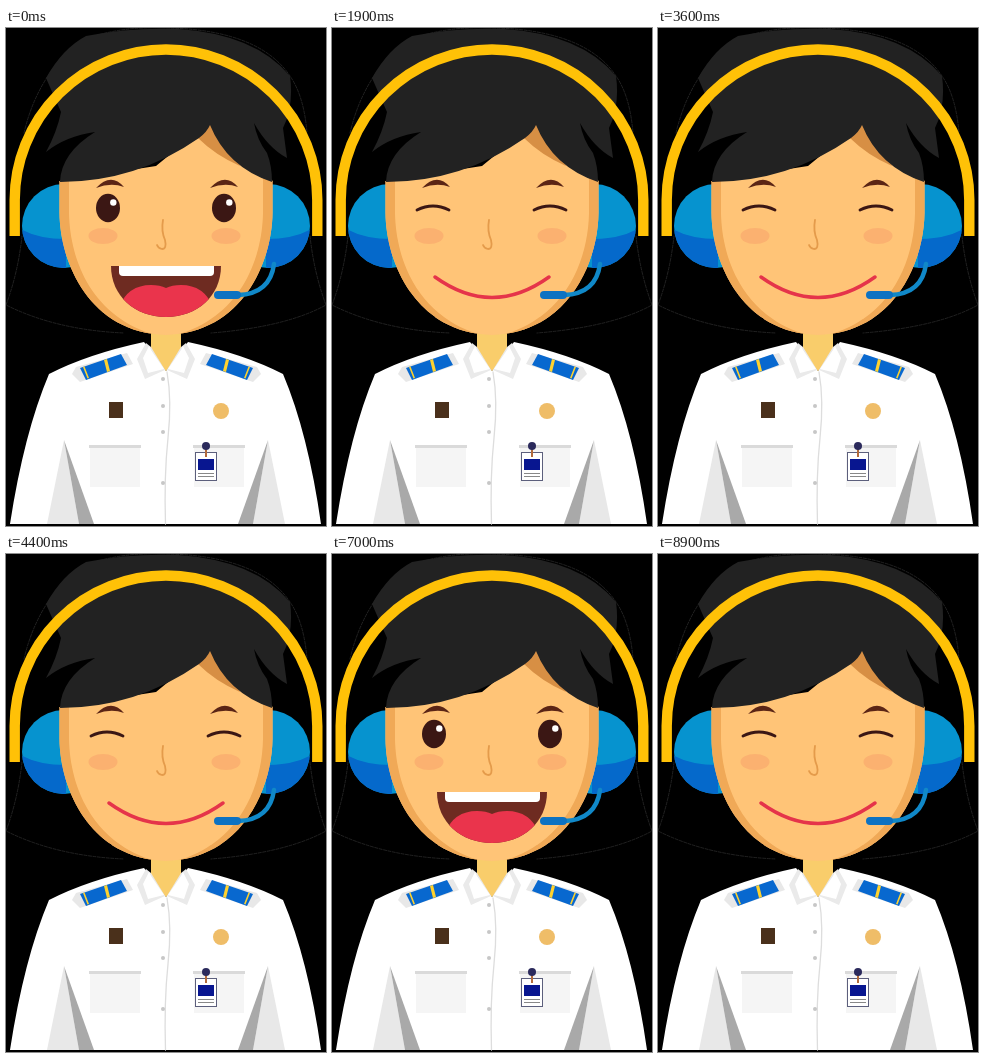
An HTML page for the animation above (9 s loop, 320 by 498 pixels).

```html
<!DOCTYPE html>
<html lang="en">
<head>
<meta charset="utf-8">
<title>Talking operator</title>
<style>
html, body { margin: 0; width: 100%; height: 100%; overflow: hidden; background: #000; }
svg { display: block; width: 100vw; height: 100vh; }
.line { fill: none; stroke-linecap: round; }
</style>
</head>
<body>
<svg viewBox="0 0 320 498" preserveAspectRatio="none">
  <defs>
    <clipPath id="faceClip"><path d="M53.5 153V185C54 235 84 305 160 307C236 305 266 235 266.5 185V153L206 92L150 138Z"/></clipPath>
    <clipPath id="grinClip"><path d="M105 238H215C215 268 191 289 160 289S105 268 105 238Z"/></clipPath>
    <clipPath id="roundClip"><path d="M136 254Q139 236 160 236Q181 236 184 254V268C184 283 174 291 160 291S136 283 136 268Z"/></clipPath>
    <clipPath id="cupClip"><circle cx="58" cy="198" r="42"/></clipPath>
    <g id="cup">
      <circle cx="58" cy="198" r="42" fill="#0693cf"/>
      <path clip-path="url(#cupClip)" d="M10 198Q28 211 60 211V245H10Z" fill="#0569cb"/>
    </g>
    <g id="openEye">
      <ellipse cx="102" cy="180" rx="12" ry="14.2" fill="#3b1714"/>
      <circle cx="107.3" cy="174.5" r="3.2" fill="#fff"/>
    </g>
    <path id="shutEye" class="line" d="M85 182Q101 174 117 182" stroke="#3b1714" stroke-width="2.8"/>
    <path id="brow" d="M90 160Q105 144 118 159Q105 154 90 160Z" fill="#5b2515"/>
    <g id="shoulder">
      <path d="M66 346L70 339L121 325L127 336L74 354Z" fill="#e8e8e8"/>
      <path d="M74 340L115 326L121 337L80 352Z" fill="#0868cf"/>
      <path d="M98 332L101 331L104 343L101 344ZM77 339L78.5 338.5L83 350L81.5 350.5Z" fill="#ffd22e"/>
    </g>
    <g id="sleeveFold">
      <path d="M58 412L41 496H73Z" fill="#e8e8e8"/>
      <path d="M58 412L73 496H88Z" fill="#a9a9a9"/>
    </g>
    <g id="pocket">
      <path d="M84 417H134V459H84Z" fill="#f5f5f5"/>
      <path d="M83 417H135V420H83Z" fill="#dadada"/>
    </g>
  </defs>

  <rect width="320" height="498"/>

  <g class="line" stroke="#2a2a2a" stroke-width=".8" stroke-dasharray="3 1.5">
    <path d="M16 208Q12 245 0 277Q50 302 118 305M304 208Q308 245 320 277Q280 299 205 305"/>
    <path d="M18 105Q31 49 72 14Q112 -3 165 0Q254 3 284 48Q298 68 301 105"/>
  </g>

  <path d="M145 292H175V326L160 343L145 326Z" fill="#f9cd6b"/>

  <g id="jacket">
    <path d="M4 496Q18 405 43 346Q82 326 138 314L160 343L182 314Q238 326 277 346Q302 405 315 496Z" fill="#fff"/>
    <use href="#sleeveFold"/>
    <use href="#sleeveFold" transform="translate(320) scale(-1 1)"/>
    <path d="M145 322L160 343L175 322V302H145Z" fill="#f9cd6b"/>
    <g id="collarSide">
      <path d="M140 315L131 331L139 351L159 342L145 319Z" fill="#eaeaea"/>
      <path d="M143 318L137 330L142 345L158 341L145 322Z" fill="#fff"/>
    </g>
    <use href="#collarSide" transform="translate(320) scale(-1 1)"/>
    <path class="line" d="M161 344Q166 372 162 410T159.5 496" stroke="#ddd" stroke-width="1.3"/>
    <g id="buttons" fill="#c7c7c7"></g>
    <use href="#shoulder"/>
    <use href="#shoulder" transform="translate(321) scale(-1 1)"/>
    <use href="#pocket"/>
    <use href="#pocket" x="104"/>
    <rect x="103" y="374" width="14" height="16" fill="#4a301b"/>
    <circle cx="215" cy="383" r="8" fill="#efbd68"/>
    <rect x="189.5" y="424.5" width="21" height="28" fill="#fff" stroke="#5c5f7c"/>
    <path d="M192 431H208V442H192Z" fill="#081690"/>
    <path d="M192 445.5H208M192 448.5H208" stroke="#888"/>
    <path d="M200 421V429" stroke="#b36b3b" stroke-width="2"/>
    <circle cx="200" cy="418" r="4" fill="#2b2a5c"/>
  </g>

  <use href="#cup"/>
  <use href="#cup" transform="translate(320) scale(-1 1)"/>

  <g clip-path="url(#faceClip)">
    <rect x="50" y="60" width="220" height="255" fill="#ffc477"/>
    <path id="cheekShade" d="M50 145H63V185C64 235 88 290 150 307L50 310Z" fill="#f0a957"/>
    <use href="#cheekShade" transform="translate(320) scale(-1 1)"/>
    <path d="M204 94L192 110Q209 127 234 138L220 110Z" fill="#d78f44"/>
  </g>

  <path fill="#222" d="M40 124Q51 104 55 84L40 50Q57 20 80 8Q125 -1 172 1Q249 6 284 48Q288 78 277 100L281 130Q262 120 248 95Q251 112 261 125Q266 138 266 154Q221 139 204 97Q201 104 193 110Q130 154 54 154Q55 125 89 104Q60 108 40 124Z"/>
  <path class="line" d="M8.7 208V172A151.3 150.5 0 0 1 311.3 172V208" stroke="#ffc107" stroke-width="10.4" style="stroke-linecap:butt"/>

  <g fill="#fbb170">
    <ellipse cx="97" cy="208" rx="14.5" ry="8"/>
    <ellipse cx="220" cy="208" rx="14.5" ry="8"/>
  </g>
  <use href="#brow"/>
  <use href="#brow" x="114"/>
  <path class="line" d="M157 192Q155 203 159 212Q161 221 156 221Q152 220 151 217" stroke="#e49b4b" stroke-width="1.8"/>

  <g id="eyesOpen"><use href="#openEye"/><use href="#openEye" x="116"/></g>
  <g id="eyesShut"><use href="#shutEye"/><use href="#shutEye" x="117"/></g>

  <g id="grin" clip-path="url(#grinClip)">
    <rect x="104" y="237" width="112" height="54" fill="#6e2b21"/>
    <path d="M113 237H208V244Q208 248 204 248H117Q113 248 113 244Z" fill="#fff"/>
    <path d="M113 279Q122 257 145 257Q154 257 160 260Q166 257 175 257Q198 257 207 279V292H113Z" fill="#ea344c"/>
  </g>
  <g id="round" clip-path="url(#roundClip)">
    <rect x="135" y="235" width="50" height="58" fill="#692f1d"/>
    <path d="M135 235H185V253.5H135Z" fill="#fff"/>
    <path d="M136 293V281Q145 273 160 273Q175 273 184 281V293Z" fill="#d0233f"/>
  </g>
  <path id="smile" class="line" d="M103 249Q160 290 217 249" stroke="#e5344a" stroke-width="3.4"/>

  <g class="line">
    <path d="M268 236Q264 266 232 267" stroke="#1088c8" stroke-width="4.5"/>
    <path d="M212 267H231" stroke="#0d72c2" stroke-width="8"/>
  </g>
</svg>
<script>
const byId = id => document.getElementById(id);
const show = (id, on) => byId(id).setAttribute("visibility", on ? "visible" : "hidden");

byId("buttons").innerHTML = [351, 378, 404, 455]
  .map(y => `<circle cx="157" cy="${y}" r="2"/>`).join("");

const LOOP = 9000, STEP = 100;
const poses = ["grin", "smile", "round", "grin", "smile"];

function render(time) {
  const pose = poses[Math.floor(time % LOOP / STEP) % poses.length];
  for (const mouth of ["grin", "smile", "round"]) show(mouth, mouth === pose);
  show("eyesShut", pose === "smile");
  show("eyesOpen", pose !== "smile");
}

let start;
function tick(now) {
  start ??= now;
  render(now - start);
  requestAnimationFrame(tick);
}
render(0);
requestAnimationFrame(tick);
</script>
</body>
</html>
```
